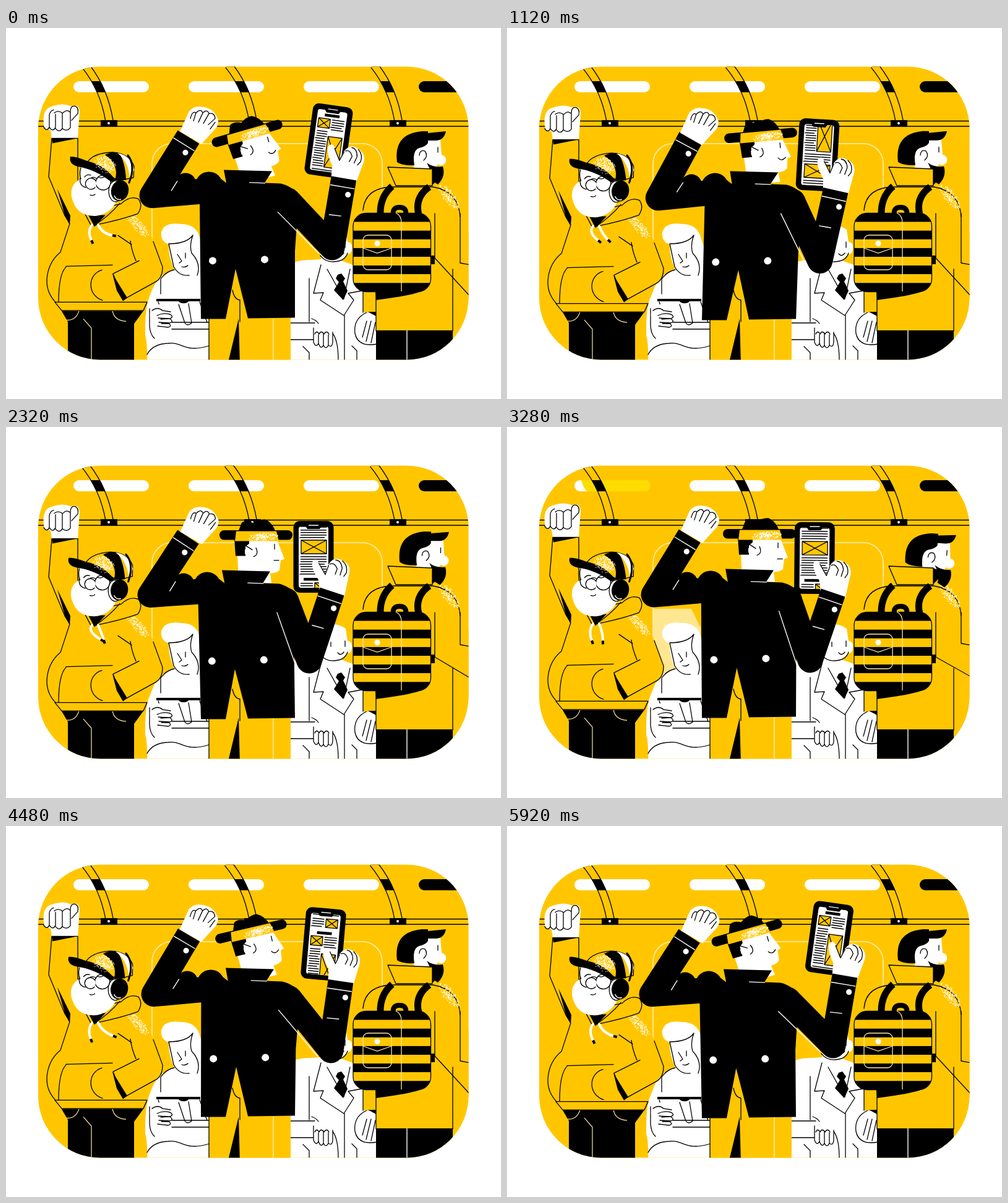
Write an HTML page that moves like this. It is 800 px wide and 600 px high and loops after 6 s.

```html
<!DOCTYPE html>
<html lang="en">
<head>
<meta charset="utf-8">
<title>Commuters</title>
<style>
html, body { margin: 0; width: 100%; height: 100%; overflow: hidden; background: #fff; }
svg { display: block; width: 100vw; height: 100vh; }
.y { fill: #ffc600; }
.w { fill: #fff; }
.l { fill: none; stroke: #000; stroke-width: 1.3; stroke-linecap: round; stroke-linejoin: round; }
.yl { fill: #ffc600; stroke: #000; stroke-width: 1.3; stroke-linejoin: round; }
.p { fill: none; stroke: #fff; stroke-width: 1.4; }
.arm { fill: none; stroke: #000; stroke-width: 41; stroke-linejoin: round; }
.bow { fill: none; }
</style>
</head>
<body>
<svg viewBox="0 0 800 600" xmlns="http://www.w3.org/2000/svg">
<defs>
  <clipPath id="car"><rect x="52" y="62.5" width="695.5" height="474" rx="100"/></clipPath>
  <clipPath id="lampRow"><rect x="52" y="86" width="696" height="18"/></clipPath>
  <clipPath id="screenClip"><rect x="-24" y="-49" width="48" height="99" rx="4"/></clipPath>
  <clipPath id="bag"><rect x="561" y="299.5" width="125.5" height="127" rx="21"/></clipPath>
</defs>
<g clip-path="url(#car)">
  <rect class="y" x="50" y="60" width="700" height="480"/>

  <g id="lamps"></g>
  <g id="glow">
    <path d="M120 86H222a9 9 0 0 1 0 18H132Q125 104 120 86Z" fill="#ffdc00"/>
    <path d="M236 294H298L313 325V420H236Z" fill="#ffe690"/>
  </g>
  <rect x="236" y="187" width="372" height="280" rx="32" fill="none" stroke="#fff0b8" stroke-width="1.5"/>
  <path class="yl" d="M45 150.5H755V159H45Z"/>
  <g id="straps"></g>
  <g id="bands" clip-path="url(#lampRow)"></g>

  <!-- seated reader -->
  <path class="w" d="M263 350Q249 345 251 330Q256 313 283 317Q305 317 312 335L330 390V545H228Q229 510 225 497Q224 445 236 424Q246 398 272 391Q262 368 263 350Z"/>
  <path class="l" d="M263 349L271 386Q280 402 296 400M263 349Q292 349 302 335Q296 352 300 364Q316 381 309 400M277 366L284 377L280 380M290 364V372M284 386Q290 388 294 384M272 391Q258 394 250 406V430M232 454V482Q233 496 240 502M228 528Q237 511 262 510C285 507 289 526 328 514"/>
  <path class="w" d="M246 443H313L327 478V488H266Z"/>
  <path class="l" d="M246 443L257 475M313 443L325 476M268 476H328M268 487H328M279 447L289 477Q293 483 300 477L295 446"/>
  <path d="M243 438H314V442H243Z"/><path d="M279 442a9 6 0 0 0 16 0Z"/>
  <path class="w" d="M233 460Q235 446 250 447L267 462L268 481L246 484Q231 478 233 460Z"/>
  <path class="l" d="M236 457Q245 450 253 457L266 459M244 465Q254 460 265 463Q272 467 265 470L246 469M250 471L264 470Q272 474 265 477L247 476M251 478L263 478Q269 482 262 484L245 482"/>
  <g id="pages">
    <path class="w" d="M247 440Q258 414 284 439Q300 412 312 440Z"/>
    <path class="l" d="M247 440Q266 427 285 440M253 432Q272 420 287 440M248 403Q264 427 288 440M288 440Q300 428 312 438M288 440Q296 418 310 422"/>
  </g>

  <!-- seated man in a suit -->
  <path class="w" d="M455 385Q470 374 493 375L510 374Q502 345 510 326Q528 312 549 326L552 346Q560 346 559 357Q558 367 551 366Q548 374 541 376L572 387Q582 410 579 440L602 470V545H455Z"/>
  <path class="l" d="M508 368Q516 379 530 378Q548 377 552 364M548 346V355M536 365Q541 371 546 364M525 348V355M509 383L497 429L513 428L508 440L546 465L562 440L553 429L575 425L563 384M519 390L546 438L556 390M547 465V537M490 405V475M455 477H499M455 504H497M494 470Q502 473 505 478M528 494Q537 506 537 537M480 515L490 525V537M559 514L567 522V537"/>
  <path d="M536 399L542 397L548 405L545 410L552 425L545 440L530 424L538 411L533 405Z"/>
  <path class="w" d="M497 486Q512 474 528 491V514Q510 525 497 509Z"/>
  <path class="l" d="M497 485V508Q501 518 505 510V496M505 510Q509 521 513 513V495M513 513Q517 521 521 513V496M521 513Q527 518 528 508V492M499 495Q502 488 506 495Q509 488 514 495Q518 488 522 495"/>
  <path class="w" d="M564 494Q561 473 583 460L601 468V512Q574 520 564 494Z"/>
  <path class="l" d="M600 511Q569 517 564 494Q561 470 583 460M583 474L576 500M590 474L582 507M597 476L590 509"/>

  <!-- man with the backpack -->
  <path class="y" d="M630 253Q580 258 577 295V460H598V490H722V390L748 440V330L734 300Q722 262 690 255Z"/>
  <path class="l" d="M577 295Q580 256 630 257H690Q731 264 734 305M722 390V490M598 426V490M577 425V460"/>
  <path class="l" id="sleeve"/>
  <path d="M585 459H598V466ZM597 425H673Q660 432 598 440ZM685 368H693V382H685Z"/>
  <path d="M598 489H722V545H598Z"/><path class="p" d="M648 489V540"/>
  <g id="specksRight"></g>
  <g id="headRight">
    <path class="w" d="M656 195L682 180L702 181L704 205Q713 208 711 216Q707 223 698 220L690 240L660 232Z"/>
    <path d="M632 217Q626 171 672 167H682V186Q678 192 668 194Q656 198 660 222Q640 223 632 217ZM681 182V170L711 167Q708 182 694 182Z"/>
    <path d="M680 218Q690 226 706 224Q711 240 698 253L686 246Q690 236 680 218Z"/>
    <path class="l" d="M668 206Q669 196 677 199Q683 207 675 214M698 193V201"/>
    <circle class="w" cx="703" cy="214" r="8"/>
  </g>
  <path class="yl" d="M617 225L689 228V255H630Z"/>
  <path d="M689 228L707 236L689 254Z"/>
  <g fill="none" stroke="#000" stroke-width="11">
    <path d="M605 302Q604 273 624 256M667 302Q660 274 684 257"/>
    <path d="M626 302Q624 290 636 290Q648 290 646 302" stroke-width="8"/>
  </g>
  <g clip-path="url(#bag)" id="bagStripes"></g>
  <rect class="l" x="561" y="299.5" width="125.5" height="127" rx="21"/>
  <g fill="none" stroke="#ffe9a0" stroke-width="1.3">
    <rect x="577" y="335" width="46" height="56" rx="8"/>
    <path d="M577 356L600 364L623 356M630 299Q639 303 639 315V426"/>
  </g>
  <circle class="w" cx="600" cy="348.5" r="4.6"/>

  <!-- boy in a hoodie -->
  <path id="jeans" d="M89 456H223L207 478V560H100V475Z"/>
  <g id="jeansLines" fill="none" stroke="#ffe9a0" stroke-width="1.2"><path d="M118 457Q113 473 98 472M172 457Q175 473 194 474M125 470L138 485V560"/></g>
  <g id="boy">
    <path class="y" d="M73 178H116V245L125 290L216 278L238 345L253 388Q252 405 240 413L228 443H222V457H90L79 443Q60 415 70 390L88 350L103 316L69 240Z"/>
    <path class="w" d="M62 162Q56 130 75 126Q92 120 105 126Q118 121 119 135L116 178H74L72 165Z"/>
    <path class="l" d="M61 160Q66 168 70 160V140Q72 133 77 132M70 160Q76 169 80 160V139M80 162Q86 170 91 162V137Q84 132 78 137M91 162Q98 168 104 161V136Q98 130 92 137M104 136Q104 124 112 126Q118 129 116 138L106 149"/>
    <path d="M74 178H115L75 186ZM83 260L104 303L103 318L95 302Z"/>
    <path class="l" d="M74 178H116V240Q117 270 126 290M74 178L69 240L95 303L103 316L88 362C66 380 56 418 80 443H228M79 443L90 456.5H222L228 443M97 385L172 383M97 386Q85 398 85 443M155 391C131 398 131 432 156 440M238 345L253 386Q253 404 242 410L193 437M215 376L173 397L190 440M181 335L203 350M201 344Q203 360 210 376"/>
    <path d="M172 397L196 436L189 441L179 424Z"/>
    <g id="specksBoy"></g>
    <path class="yl" d="M126 297L137 318L145 318Q185 310 213 300Q222 287 214 276Q200 270 186 284Z"/>
    <path class="l" d="M144 318Q166 304 184 283"/>
    <path d="M133 302H161L143 321Z"/>
    <path id="cords" fill="none" stroke="#fff" stroke-width="4" stroke-linecap="round"/>
    <path id="cordTips" fill="none" stroke="#000" stroke-width="4"/>
  </g>
  <g id="boyHead">
    <path class="w" d="M121 222Q117 236 121 244Q103 252 106 273Q113 305 145 304Q172 300 180 276L178 240Z"/>
    <path class="l" d="M121 226Q118 236 121 244M127 241Q131 236 137 238M149 241Q155 244 160 240M136 270Q140 272 144 269M147 244Q143 240 138 242"/>
    <circle class="l" cx="157" cy="250" r="12"/>
    <path class="l" d="M120 243Q118 255 129 258"/>
    <circle class="w" cx="137" cy="252" r="9"/><path class="l" d="M145 247A9 9 0 1 0 144 258"/>
    <path class="yl" d="M131 218Q140 202 172 201Q200 203 207 224L206 242L182 247Z"/>
    <path d="M160 205Q172 199 183 202Q193 218 194 246L176 246Q184 222 160 205Z"/>
    <path class="w" d="M180 202Q204 207 207 230L200 244Q199 217 180 202Z"/>
    <path d="M104 208Q112 207 131 215Q160 222 177 246L170 249Q145 229 116 224Q101 220 104 208Z"/>
    <g id="specksCap"></g>
    <path class="l" d="M197 206Q210 222 199 250" style="stroke-width:3"/>
    <ellipse class="w" cx="177" cy="264" rx="11" ry="17" stroke="#000" stroke-width="1.3"/>
    <ellipse cx="184" cy="263" rx="14" ry="17" transform="rotate(14 184 263)"/>
    <path class="p" d="M175 271Q178 279 186 277"/>
  </g>

  <!-- man in the black coat -->
  <path class="y" d="M328 380H460V545H328Z"/>
  <path d="M376 470L378 545H358Z"/><path class="l" d="M366 424Q369 439 378 440V475M328 465V540"/>
  <path d="M432 470V540" class="p" style="stroke:#fff0b8"/>
  <g id="head">
    <path class="w" d="M376 180H441L453 211L447 213L445 229Q440 234 430 234L432 250H379Z"/>
    <path d="M372 178H396V186L390 191V206H374Z"/>
    <path class="w" d="M389 196Q396 186 405 193Q412 202 404 208Q394 212 389 202Z"/>
    <path class="l" d="M390 189L401 196M407 193Q412 204 403 207M437 187V195"/>
    <path class="l" id="mouth"/>
    <rect x="348" y="164.5" width="118" height="15.5" rx="7.5"/>
    <path d="M377 170L384 152Q391 147 403 153Q412 146 422 147Q434 152 440 170Z"/>
    <path class="y" d="M375 166H440L444 182H373Z"/>
    <g id="specksHat"></g>
  </g>
  <path class="arm" id="armLeft"/>
  <g id="handLeft">
    <path class="w" d="M281 167L296 134Q305 125 316 127Q336 128 343 148Q344 158 336 165L316 187Z"/>
    <path class="l" d="M298 146Q301 133 307 137L303 150M307 137Q315 129 318 137L311 152M318 137Q325 130 328 138L319 154M328 138Q337 136 338 146L327 156M338 152L330 163"/>
  </g>
  <g id="cuffLeft"><path class="p" d="M-20 14H20"/><circle class="w" cx="9" cy="24" r="4.6"/></g>
  <g id="coat">
    <circle cx="290" cy="251" r="17"/><circle cx="328" cy="254" r="22"/>
    <path d="M352 229L430 231L418 250L444 251Q466 256 473 275L467 360L467 468L391 469L371 389L355 470H315L313 282L335 234L356 250Z"/>
    <path class="p" d="M393 249.5L419 250.5M267 263L277 247"/>
    <circle class="w" cx="334" cy="376" r="6"/><circle class="w" cx="418" cy="374" r="6"/>
  </g>
  <g id="phone">
    <rect x="-32.5" y="-58" width="65" height="116" rx="10"/>
    <rect class="w" x="-24" y="-49" width="48" height="99" rx="4"/>
    <g clip-path="url(#screenClip)"><g id="feed"></g></g>
    <path d="M-13 -50H13L10 -45H-10Z"/><path class="p" d="M-8 -51H8"/>
  </g>
  <g id="handRight">
    <path class="w" d="M-20 7L-22 -17Q-37 -38 -33 -48Q-28 -54 -23 -46L-12 -28L-8 -42Q0 -58 14 -51Q31 -45 26 -26L20 8Z"/>
    <path class="l" d="M-23 -45L-12 -27L-7 -42M-5 -44Q2 -48 7 -37L4 -28M4 -51Q13 -51 15 -38L12 -27M15 -50Q24 -43 22 -31L18 -25"/>
  </g>
  <circle id="shoulder" r="20.5"/>
  <path class="arm" id="armRight"/>
  <path class="p" id="armFold"/>
  <g id="cuffRight"><path class="p" d="M-20 14H20M-14 62L6 61"/><circle class="w" cx="11" cy="25" r="4.6"/></g>
</g>
</svg>
<script>
const $ = id => document.getElementById(id);
const set = (id, name, value) => $(id).setAttribute(name, value);
const move = (id, x, y, extra = '') => set(id, 'transform', `translate(${x} ${y}) ${extra}`);
const LOOP = 6000, STEP = 80, FEED = 260;

let seed = 7;
const random = () => (seed = seed * 16807 % 2147483647) / 2147483647;

// White grain inside a tilted ellipse, denser near its centre.
function specks(id, cx, cy, rx, ry, tilt, count) {
  let d = '';
  for (let i = 0; i < count; i++) {
    const a = random() * 2 * Math.PI, r = random() ** 0.7;
    d += `M${(rx * r * Math.cos(a)).toFixed(1)} ${(ry * r * Math.sin(a)).toFixed(1)}h1.2v1.2h-1.2z`;
  }
  $(id).innerHTML = `<path class="w" transform="translate(${cx} ${cy}) rotate(${tilt})" d="${d}"/>`;
}
specks('specksHat', 417, 175, 25, 6.5, -4, 230);
specks('specksCap', 160, 220, 18, 13, 25, 230);
specks('specksBoy', 213, 318, 25, 8, 47, 170);
specks('specksRight', 716, 272, 24, 9, 52, 190);

$('lamps').innerHTML = [109, 295, 481, 667].map((x, i) =>
  `<rect x="${x}" y="86" width="122" height="18" rx="9" fill="${i < 3 ? '#fff' : '#000'}"/>`).join('');
const bow = (color, width) => `<path class="bow" stroke="${color}" stroke-width="${width}"/>`;
const atStraps = content => [166, 398, 633].map(x => `<g transform="translate(${x} 0)">${content}</g>`).join('');
$('straps').innerHTML = atStraps(bow('#000', 13.5) + bow('#ffc600', 10.8)
  + '<rect x="-13" y="149" width="27" height="10.5"/><circle class="w" cy="154" r="2"/>');
$('bands').innerHTML = atStraps(bow('#000', 13.5));
$('bagStripes').innerHTML = Array.from({ length: 9 }, (_, i) =>
  `<rect x="561" y="${299.5 + i * 14.1}" width="126" height="14.3" fill="${i % 2 ? '#ffc600' : '#000'}"/>`).join('');

// Article on the phone, repeating every FEED units.
const picture = (x, y, w, h) =>
  `<path class="yl" d="M${x} ${y}h${w}v${h}h${-w}zl${w} ${h}m0 ${-h}l${-w} ${h}"/>`;
const text = (x, y, w, rows) => Array.from({ length: rows }, (_, i) =>
  `<path d="M${x} ${y + i * 4}h${i % 4 == 3 ? w - 3 : w}v1.5h${-w}z"/>`).join('');
const bar = (y, x = 12) => `<rect x="${x}" y="${y}" width="24" height="4.5"/>`;
const article = bar(6) + picture(3, 14, 19, 15) + text(25, 14, 20, 5) + text(3, 34, 17, 15)
  + picture(22, 42, 23, 50) + text(3, 96, 42, 4) + picture(4, 113, 41, 22) + text(3, 139, 42, 8)
  + bar(174, 8) + text(3, 182, 20, 4) + picture(26, 182, 19, 15) + text(3, 202, 42, 10)
  + picture(25, 245, 19, 14) + text(3, 245, 19, 4);
$('feed').innerHTML = `<g>${article}</g><g transform="translate(0 ${FEED})">${article}</g>`;

const TIMES = [0, 640, 1680, 2320, 3280, 4480, 5920];
const POSES = {
  sway: [0, 7, 10, -3, 1, 3, -2],
  tilt: [-16, -9, 0, 0, 0, -13, -16],
  elbowX: [527, 515, 494, 490, 490, 525, 527],
  elbowY: [355, 373, 381, 378, 377, 363, 355],
  cuffX: [546, 534, 528, 527, 527, 541, 546],
  cuffY: [243, 258, 268, 266, 268, 251, 242],
  phoneX: [521.5, 506, 497, 497, 497, 513, 521],
  phoneY: [182.5, 200, 212, 210, 212, 191, 182],
  phoneTilt: [8, 6, 0, 0, 0.5, 5, 8],
  scroll: [0, 30, 72, 91, 91, 237, FEED],
  turnX: [0, 0, 0, 4, 11, 0, 0],
  turnY: [0, -2, 2, 2, 5, 0, 0],
  turn: [0, 0, 0, 1, 4, 0, 0],
  sleeveY: [432, 432, 432, 404, 402, 432, 432],
  cordAX: [138, 153, 140, 153, 137, 137, 139],
  cordAY: [343, 340, 342, 341, 345, 344, 344],
  cordBX: [172, 156, 172, 158, 155, 173, 172],
  cordBY: [335, 342, 337, 342, 345, 339, 337],
};
function poseAt(t) {
  let i = TIMES.length - 1;
  while (TIMES[i] > t) i--;
  const next = Math.min(i + 1, TIMES.length - 1);
  const u = next > i ? (t - TIMES[i]) / (TIMES[next] - TIMES[i]) : 0;
  const ease = u * u * (3 - 2 * u), pose = {};
  for (const key in POSES) pose[key] = POSES[key][i] + (POSES[key][next] - POSES[key][i]) * ease;
  return pose;
}

// Places a group at the cuff with its y axis running down the forearm.
function placeCuff(id, cx, cy, ex, ey) {
  move(id, cx, cy, `rotate(${Math.atan2(cx - ex, ey - cy) * 180 / Math.PI})`);
}
function cord(x0, cx, cy, x, y) {
  const len = Math.hypot(x - cx, y - cy) || 1;
  return {
    line: `M${x0} 318Q${cx} ${cy} ${x} ${y}`,
    tip: `M${x} ${y}l${(x - cx) / len * 6} ${(y - cy) / len * 6}`,
  };
}

function draw(time) {
  const t = Math.floor(time % LOOP / STEP) * STEP;
  const p = poseAt(t), s = p.sway;
  const beat = t / STEP * 2 * Math.PI / 5;
  const bob = 2 - 2 * Math.cos(beat - Math.PI / 5);
  const nod = 1 - Math.cos(beat);

  document.querySelectorAll('.bow').forEach(path =>
    path.setAttribute('d', `M${-38.5 - 2 * nod} 60Q${-8 - nod} 97 1 150`));
  set('glow', 'visibility', t >= 3120 && t < 3440 ? 'visible' : 'hidden');
  set('pages', 'visibility', t >= 320 && t < 1040 ? 'visible' : 'hidden');

  move('boy', 0, bob);
  move('jeans', 0, bob * 0.8);
  move('jeansLines', 0, bob * 0.8);
  move('boyHead', -1.2 * nod, 0.8 * nod, `rotate(${-3.3 * nod} 184 263)`);
  const a = cord(139, 131, 328, p.cordAX, p.cordAY);
  const b = cord(149, 155, 332, p.cordBX, p.cordBY);
  set('cords', 'd', a.line + b.line);
  set('cordTips', 'd', a.tip + b.tip);

  move('headRight', p.turnX, p.turnY, `rotate(${p.turn} 675 225)`);
  set('sleeve', 'd', `M693 300V372L750 ${p.sleeveY + 2}M734 300V${p.sleeveY - 52}L750 ${p.sleeveY - 49}`);

  move('head', s, bob, `rotate(${p.tilt} 391 233)`);
  set('mouth', 'd', t > 2000 && t < 3900 ? 'M436 213H444' : 'M432 211Q437 218 444 211');
  set('coat', 'transform', `matrix(1 0 ${-s / 240} 1 ${s * 470 / 240} ${bob})`);

  const elbowX = 236 + s, elbowY = 270.5 + bob * 0.7 + s * 0.3;
  const wristX = 295 + s * 0.2, wristY = 176 + bob * 0.7;
  set('armLeft', 'd', `M${338 + s} ${262 + bob}L${elbowX} ${elbowY}L${wristX} ${wristY}`);
  placeCuff('cuffLeft', wristX, wristY, elbowX, elbowY);
  move('handLeft', -s * 0.15, bob);

  move('phone', p.phoneX, p.phoneY, `rotate(${p.phoneTilt})`);
  move('feed', -24, -49 - p.scroll % FEED);
  move('handRight', p.cuffX, p.cuffY, `rotate(${p.phoneTilt + 2})`);
  const shoulderX = 455 + s * 0.8, shoulderY = 278 + bob;
  move('shoulder', shoulderX, shoulderY);
  set('armRight', 'd', `M${shoulderX} ${shoulderY}L${p.elbowX} ${p.elbowY}L${p.cuffX} ${p.cuffY}`);
  set('armFold', 'd', `M${439 + s * 0.4} ${297 + bob}L${p.elbowX - 21} ${p.elbowY + 10}`);
  placeCuff('cuffRight', p.cuffX, p.cuffY, p.elbowX, p.elbowY);
}

const start = performance.now();
function tick() {
  draw(performance.now() - start);
  requestAnimationFrame(tick);
}
tick();
</script>
</body>
</html>
```
